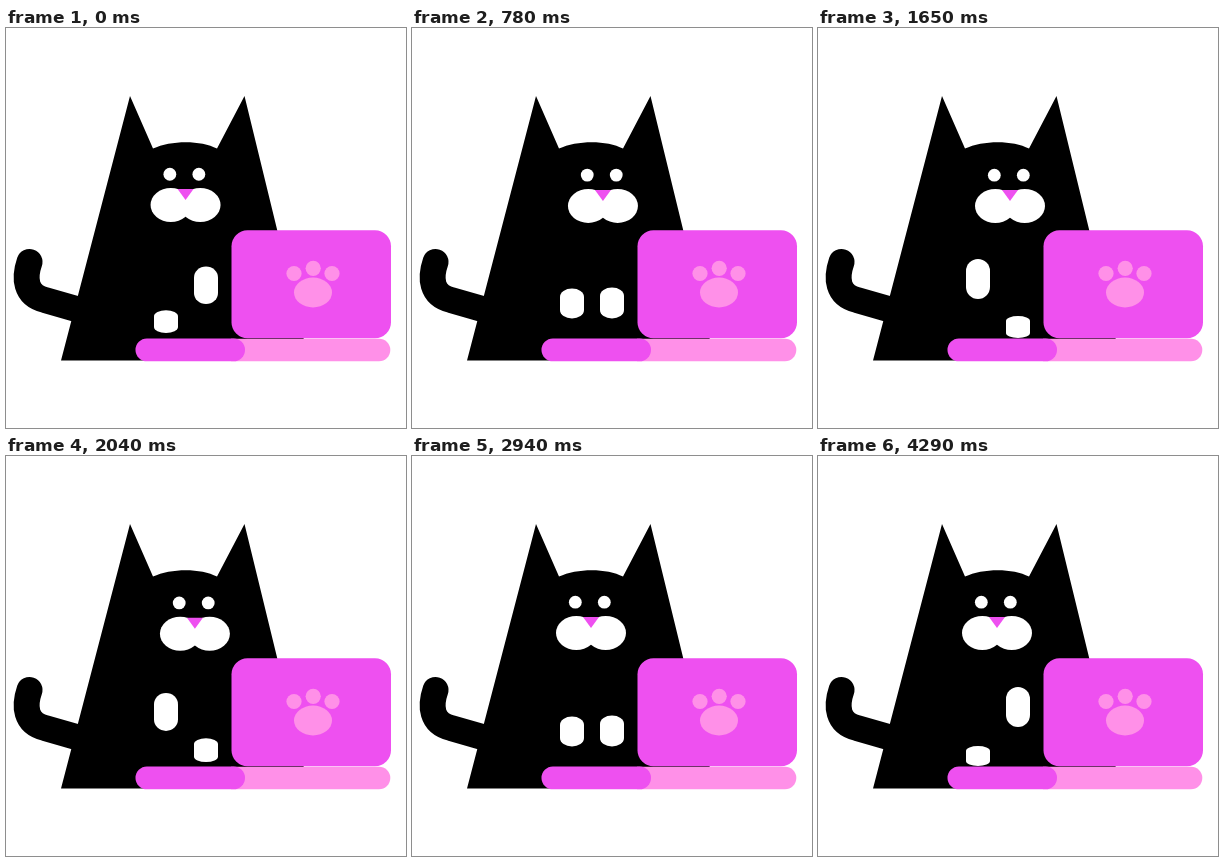
Write an HTML page with a canvas that moves like this. It is 400 px wide and 400 px high and loops after 4470 ms.

```html
<!DOCTYPE html>
<html lang="en">
<head>
<meta charset="utf-8">
<title>Typing cat</title>
<style>
html, body { margin: 0; width: 100%; height: 100%; overflow: hidden; background: #fff; }
canvas { display: block; width: 400px; height: 400px; }
</style>
</head>
<body>
<canvas id="stage" width="400" height="400"></canvas>
<script>
const ctx = document.getElementById('stage').getContext('2d');
const LOOP = 4470, STEP = 30, LAST = 4290;
const PINK = '#ee50f0', LIGHT = '#ff90e8';
const body = new Path2D('M124 68L147 120.5C165 112 195 112 211 120.5L238.500 68L303 332.500H55Z');
const tail = new Path2D('M23.500 234C18 250 19 267 39 272L72 281.500');

// One tap cycle of the left paw: 0 is raised, 1 is pressed.
const TAP = [0, .1, .36, .67, 1, .87, .69, .5, .32, .17, .06, .01];

const clamp = x => Math.min(1, Math.max(0, x));
const ease = x => .5 - .5 * Math.cos(Math.PI * clamp(x));

function ellipse(x, y, rx, ry, color) {
  ctx.fillStyle = color;
  ctx.beginPath();
  ctx.ellipse(x, y, rx, ry, 0, 0, Math.PI * 2);
  ctx.fill();
}

function box(x, y, r, b, radii, color) {
  ctx.fillStyle = color;
  ctx.beginPath();
  ctx.roundRect(x, y, r - x, b - y, radii);
  ctx.fill();
}

function paw(x, top, press) {
  const y = 231 + (top - 231) * press;
  box(x, y, x + 24, 271 + 39 * press, { x: 12, y: 12 - 7 * press }, '#fff');
}

function face(t) {
  const turn = ease((t + 150) / 1140) - ease((t - 1680) / 1110);
  const lid = 1 - .9 * clamp(1 - Math.abs(t - 3870) / 150);
  ctx.save();
  ctx.translate(13 * turn, turn);
  for (const x of [163.3, 192.3]) ellipse(x, 146.2, 6.4, 6.4 * lid, '#fff');
  for (const x of [164.3, 193.7]) ellipse(x, 177, 20.3, 17, '#fff');
  ctx.fillStyle = PINK;
  ctx.beginPath();
  ctx.moveTo(171, 161);
  ctx.lineTo(187, 161);
  ctx.lineTo(179, 172);
  ctx.fill();
  ctx.restore();
}

function laptop() {
  box(225.5, 202.3, 385, 310.2, 16, PINK);
  box(225, 310.7, 384.3, 333.3, [0, 11.3, 11.3, 0], LIGHT);
  box(129.5, 310.5, 239, 333.3, 11.4, PINK);
  ellipse(307, 264.5, 19, 15, LIGHT);
  for (const [x, y] of [[288, 245.5], [307.2, 240.3], [326, 245.5]]) {
    ellipse(x, y, 7.6, 7.6, LIGHT);
  }
}

function draw(time) {
  const frame = Math.floor(Math.min(time % LOOP, LAST) / STEP);
  const press = TAP[(frame + 5) % TAP.length];
  ctx.fillStyle = '#fff';
  ctx.fillRect(0, 0, 400, 400);
  ctx.fillStyle = ctx.strokeStyle = '#000';
  ctx.lineWidth = 26;
  ctx.lineCap = 'round';
  ctx.stroke(tail);
  ctx.fill(body);
  face(frame * STEP);
  paw(148, 290, press);
  paw(188, 288, 1 - press);
  laptop();
}

function tick(now) {
  draw(now);
  requestAnimationFrame(tick);
}
draw(0);
requestAnimationFrame(tick);
</script>
</body>
</html>
```
